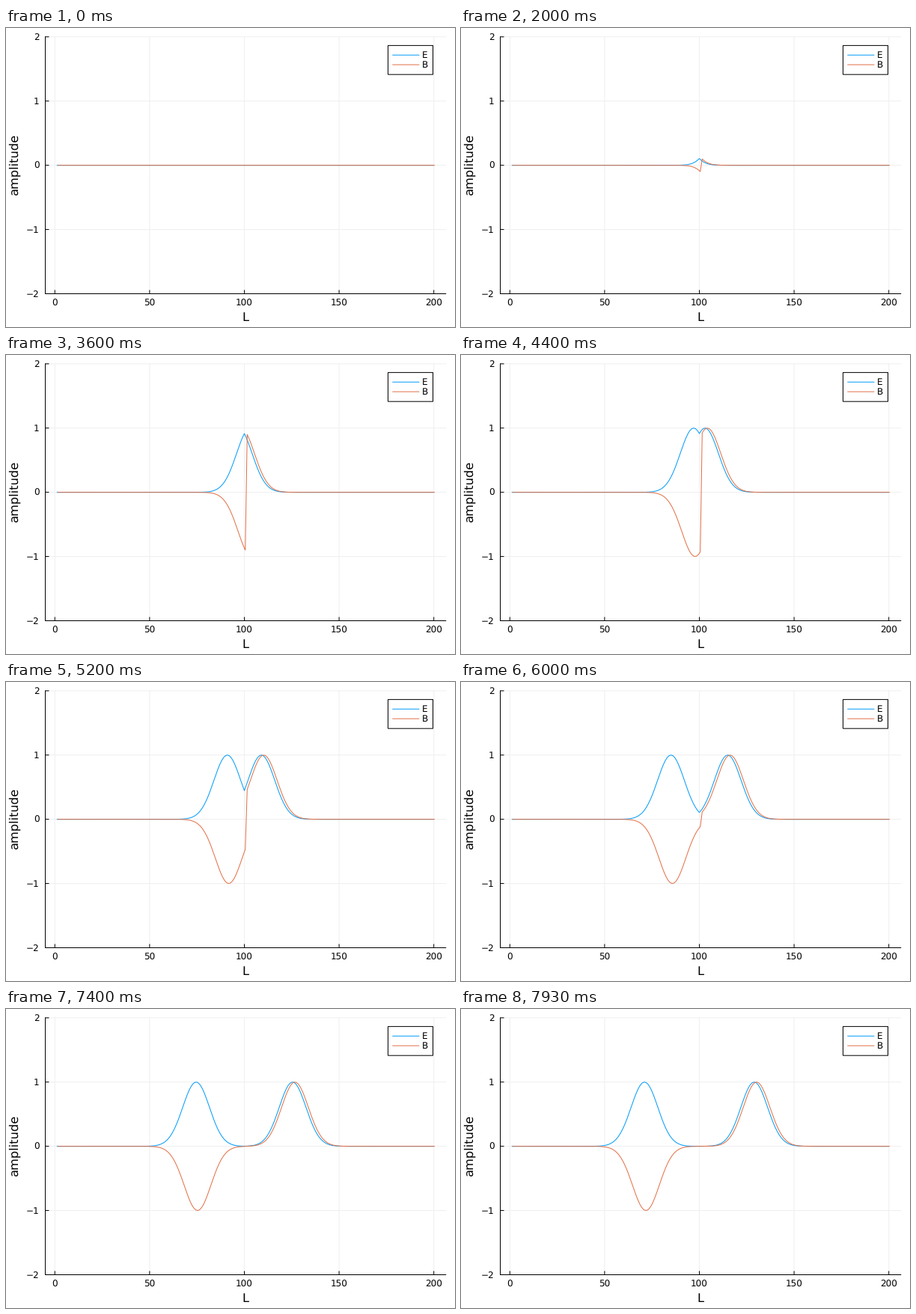
A matplotlib script for the animation above (8000 ms loop, 600 px wide and 400 px high).

```python
import numpy as np
import matplotlib.pyplot as plt
from matplotlib.animation import FuncAnimation
from matplotlib.patches import Rectangle

W, H, DPI = 600, 400, 100
PX = 72 / DPI                      # points per pixel
FRAMES, LOOP = 120, 8000
CELLS, SOURCE = 200, 99
COURANT, DELAY, SPREAD = 0.5, 60, 20

BLUE, ORANGE, GRID = "#009afa", "#e26f46", "#efefef"
LEFT, RIGHT, TOP, BOTTOM = 52.5, 588.2, 11.8, 355.5

plt.rcParams["text.hinting"] = "none"


def to_x(v):
    return 65.3 + 2.532 * np.asarray(v)


def to_y(v):
    return 183.65 - 85.92 * np.asarray(v)


def simulate():
    """Leapfrog wave steps with a Gaussian pulse fed into the middle cell."""
    e, b = np.zeros(CELLS), np.zeros(CELLS)
    history = []
    for n in range(FRAMES):
        e[:-1] -= COURANT * np.diff(b)
        e[SOURCE] = np.exp(-((n - DELAY) / SPREAD) ** 2)
        b[1:] -= COURANT * np.diff(e)
        history.append((e.copy(), b.copy()))
    return history


fig = plt.figure(figsize=(W / DPI, H / DPI), dpi=DPI, facecolor="white")
ax = fig.add_axes([0, 0, 1, 1])
ax.set_xlim(0, W)
ax.set_ylim(H, 0)
ax.axis("off")


def line(xs, ys, color="black", **kw):
    return ax.plot(xs, ys, color=color, lw=PX, snap=False,
                   solid_capstyle="butt", **kw)[0]


def label(x, y, text, size=12, ha="center", **kw):
    ax.text(x, y, text, fontsize=size * PX, family="DejaVu Sans",
            ha=ha, va="baseline", **kw)


# grid, ticks and tick labels
for v in range(0, 201, 50):
    x = to_x(v)
    line([x, x], [TOP, BOTTOM], GRID, zorder=1)
    line([x, x], [BOTTOM, BOTTOM - 5], zorder=4)
    label(x - 0.4, 371.6, str(v))
for v in range(-2, 3):
    y = to_y(v)
    line([LEFT, RIGHT], [y, y], GRID, zorder=1)
    line([LEFT, LEFT + 5], [y, y], zorder=4)
    label(44.4, y + 4.2, str(v).replace("-", "\u2212"), ha="right")

line([LEFT, LEFT], [TOP - 0.5, BOTTOM + 0.5], zorder=4)
line([LEFT - 0.5, RIGHT], [BOTTOM, BOTTOM], zorder=4)
label(319.6, 392.2, "L", 16.3)
label(16, 183.4, "amplitude", 16.3, rotation=90, rotation_mode="anchor")

# legend
ax.add_patch(Rectangle((510.5, 23.4), 60, 38.8, fc="white", ec="black",
                       lw=PX, snap=False, zorder=5))
for y, name, color in ((36.2, "E", BLUE), (49.1, "B", ORANGE)):
    line([516.3, 552.4], [y, y], color, zorder=6)
    label(556.2, y + 4.3, name, ha="left", zorder=6)

cells = np.arange(1, CELLS + 1)
e_line = line(to_x(cells), to_y(0 * cells), BLUE, zorder=2)
b_line = line(to_x(cells + 0.5), to_y(0 * cells), ORANGE, zorder=3)
waves = simulate()


def update(i):
    e, b = waves[i]
    e_line.set_ydata(to_y(e))
    b_line.set_ydata(to_y(b))
    return e_line, b_line


anim = FuncAnimation(fig, update, frames=FRAMES, interval=LOOP / FRAMES,
                     repeat=True, repeat_delay=0)
plt.show()
```
